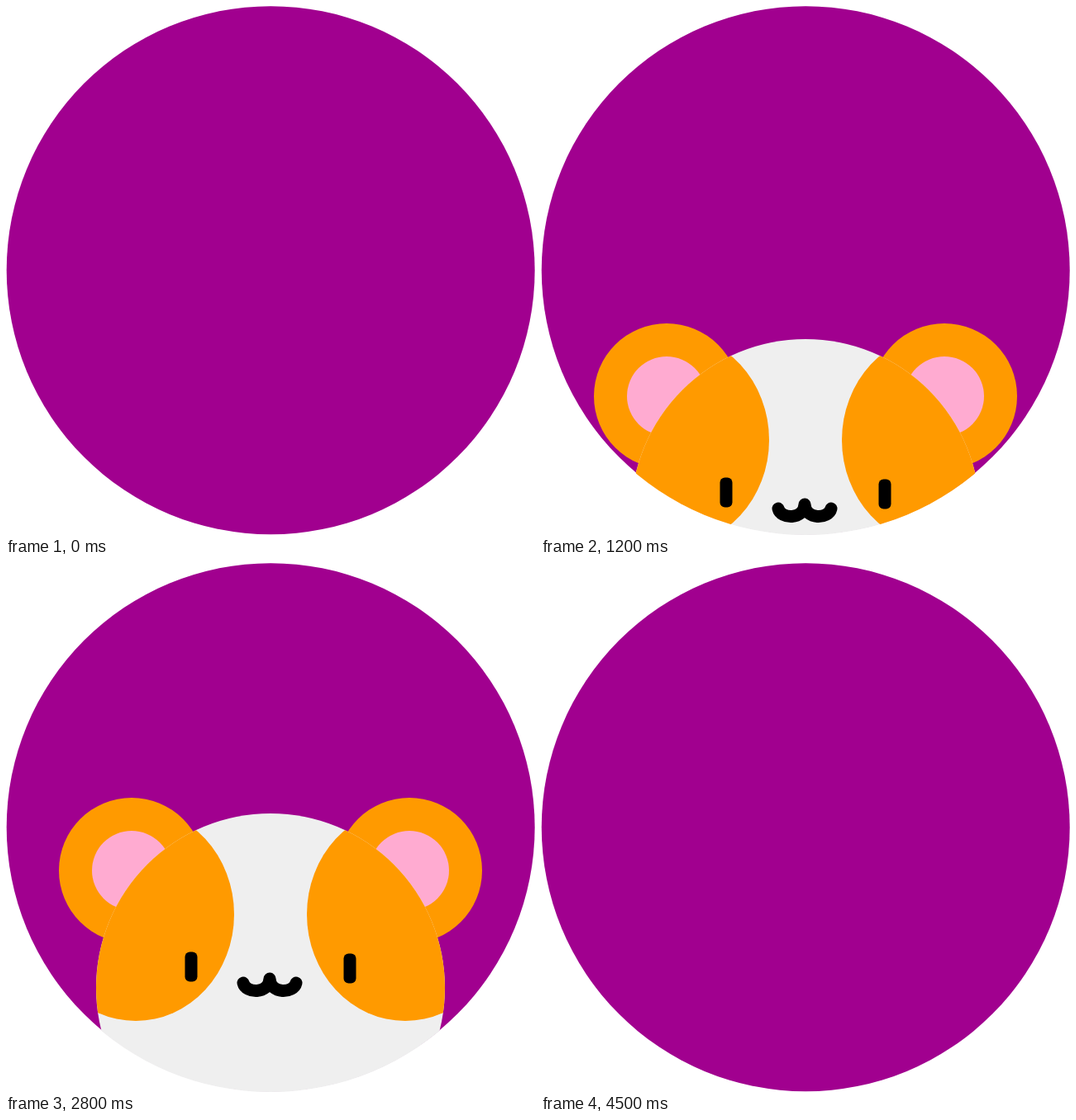
Write an HTML page that moves like this. It is 640 px wide and 640 px high and loops after 4600 ms.

```html
<!DOCTYPE html>
<html lang="en">
<head>
<meta charset="utf-8">
<title>Peeking hamster</title>
<style>
  html, body { margin: 0; width: 100%; height: 100%; overflow: hidden; background: #fff; }
  svg { display: block; width: 100vw; height: 100vh; }

  .hamster { animation: peek 4600ms infinite; }

  /* Rise and sink in 20px steps, one every 100 ms. */
  @keyframes peek {
    0%     { transform: translateY(360px); animation-timing-function: steps(18, end); }
    39.13% { transform: translateY(0); animation-timing-function: step-end; }
    58.69% { transform: translateY(0); animation-timing-function: steps(18, end); }
    97.82%, 100% { transform: translateY(360px); }
  }

  .fur { fill: #ff9a00; }
  .inner-ear { fill: #ffabd1; }
  .head { fill: #efefef; }
  .mouth { fill: none; stroke: #000; stroke-width: 15; stroke-linecap: round; stroke-linejoin: round; }
</style>
</head>
<body>
<svg viewBox="0 0 640 640">
  <defs>
    <clipPath id="stage"><circle cx="320" cy="320" r="320"/></clipPath>
    <clipPath id="headClip"><circle cx="320" cy="494" r="211"/></clipPath>
    <g id="ear">
      <circle class="fur" cx="152" cy="352" r="88"/>
      <circle class="inner-ear" cx="152" cy="352" r="48"/>
    </g>
    <ellipse id="patch" class="fur" cx="157" cy="405" rx="119" ry="129"/>
    <rect id="eye" x="216.5" y="450.5" width="15" height="36" rx="6"/>
  </defs>

  <circle cx="320.2" cy="319.7" r="319.5" fill="#a1008f"/>
  <g clip-path="url(#stage)">
    <g class="hamster">
      <use href="#ear"/>
      <use href="#ear" transform="matrix(-1 0 0 1 640 0)"/>
      <circle class="head" cx="320" cy="494" r="211"/>
      <g clip-path="url(#headClip)">
        <use href="#patch"/>
        <use href="#patch" transform="matrix(-1 0 0 1 640 0)"/>
      </g>
      <use href="#eye"/>
      <use href="#eye" x="192" y="2"/>
      <path class="mouth" d="M287 488C290 501 318 502 319 483C320 502 348 501 351 488"/>
    </g>
  </g>
</svg>
</body>
</html>
```
